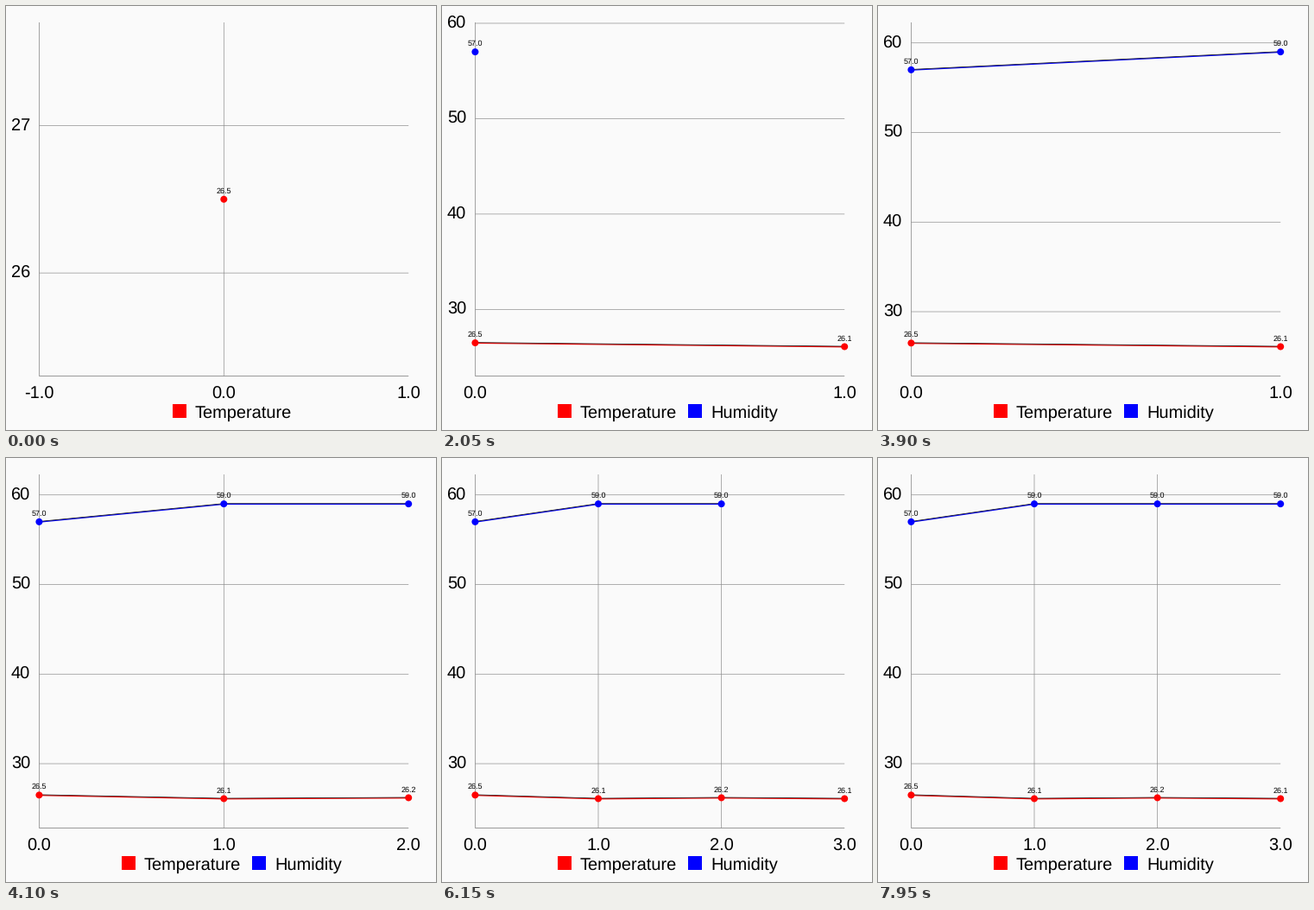
Recreate the animation shown at these times as a matplotlib script. Size 498 px wide and 491 px high, loop 8 s.

```python
import math

import matplotlib.pyplot as plt
from matplotlib.animation import FuncAnimation
from matplotlib.patches import Circle, Rectangle

W, H, DPI = 498, 491, 64
PX = 72 / DPI  # points per pixel
LEFT, RIGHT, TOP, BOTTOM = 38.4, 466.2, 19.0, 428.6
STEP_MS, LOOP_MS = 50, 8000

RED, BLUE, DARK, GRAY = "#ff0000", "#0000ff", "#202020", "#888888"
TEMPERATURE = [26.5, 26.1, 26.2, 26.1]
HUMIDITY = [57.0, 59.0, 59.0, 59.0]

# start time in ms, temperature readings, humidity readings
STAGES = [(0, 1, 0), (100, 1, 1), (2050, 2, 1), (2100, 2, 2),
          (4100, 3, 3), (6150, 4, 3), (6200, 4, 4)]

plt.rcParams["font.family"] = "Liberation Sans"
plt.rcParams["text.hinting"] = "none"

fig = plt.figure(figsize=(W / DPI, H / DPI), dpi=DPI, facecolor="#fafafa")
ax = fig.add_axes([0, 0, 1, 1])
ax.set_xlim(0, W)
ax.set_ylim(H, 0)
ax.axis("off")


def line(xs, ys, color, width, z):
    return ax.plot(xs, ys, color=color, lw=width * PX, zorder=z, snap=False,
                   solid_capstyle="butt")[0]


def text(x, y, s, size=20, ha="center"):
    return ax.text(x, y, s, size=size * PX, ha=ha, va="baseline",
                   color="black", zorder=4)


def y_range(values):
    lo, hi = min(values), max(values)
    if lo == hi:
        lo, hi = lo - 1, hi + 1
    pad = 0.1 * (hi - lo)
    return lo - pad, hi + pad


def series(points, color):
    xs, ys, values = zip(*points)
    parts = []
    if len(points) > 1:
        parts.append(line(xs, [y + 0.3 for y in ys], color, 1.3, 2))
        parts.append(line(xs, [y - 0.4 for y in ys], DARK, 0.8, 3))
    for x, y, value in points:
        parts.append(ax.add_patch(Circle((x, y), 4, fc=color, lw=0, zorder=5)))
        parts.append(text(x, y - 7, f"{value:.1f}", 9))
    return parts


def legend_item(x, color, label):
    box = Rectangle((x, 461), 16, 16, fc=color, lw=0, zorder=4)
    return [ax.add_patch(box), text(x + 26, 477, label, ha="left")]


def build(n_temp, n_hum):
    temps, hums = TEMPERATURE[:n_temp], HUMIDITY[:n_hum]
    lo, hi = y_range(temps + hums)
    first, last = (-1, 1) if n_temp == 1 else (0, n_temp - 1)

    def px(i):
        return LEFT + (i - first) / (last - first) * (RIGHT - LEFT)

    def py(v):
        return TOP + (hi - v) / (hi - lo) * (BOTTOM - TOP)

    def points(values):
        return [(px(i), py(v), v) for i, v in enumerate(values)]

    parts = []
    step = 1 if hi - lo < 10 else 10
    for tick in range(math.ceil(lo / step) * step, math.floor(hi) + 1, step):
        y = py(tick)
        parts.append(line([LEFT, RIGHT], [y, y], GRAY, 0.65, 1))
        parts.append(text(28, y + 5.7, str(tick), ha="right"))
    for tick in range(first, last + 1):
        x = px(tick)
        if first < tick < last:
            parts.append(line([x, x], [TOP, BOTTOM], GRAY, 0.65, 1))
        parts.append(text(x, 455, f"{tick:.1f}"))

    parts += series(points(temps), RED)
    parts += legend_item(134 if hums else 193, RED, "Temperature")
    if hums:
        parts += series(points(hums), BLUE)
        parts += legend_item(285, BLUE, "Humidity")
    return parts


line([LEFT, LEFT], [TOP, BOTTOM], GRAY, 0.75, 1)
line([LEFT, RIGHT], [BOTTOM, BOTTOM], GRAY, 0.85, 1)
stages = [(start, build(n_temp, n_hum)) for start, n_temp, n_hum in STAGES]


def update(frame):
    now = frame * STEP_MS
    current = max(start for start, _ in stages if start <= now)
    for start, parts in stages:
        for part in parts:
            part.set_visible(start == current)
    return []


update(0)
anim = FuncAnimation(fig, update, frames=LOOP_MS // STEP_MS,
                     interval=STEP_MS, repeat=True, repeat_delay=0)
plt.show()
```
